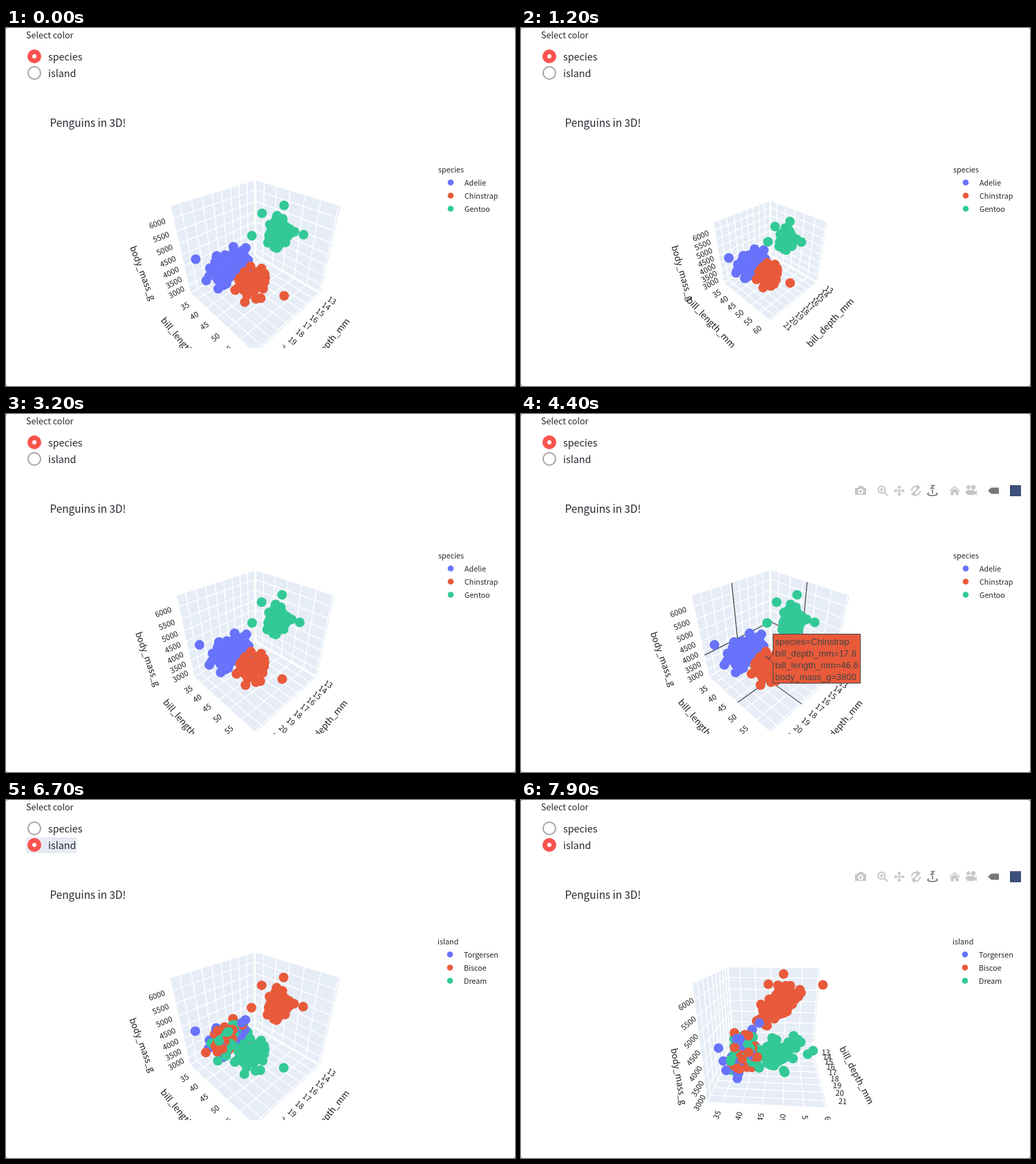
An HTML page with a canvas for the animation above (8 s loop, 736 px wide and 518 px high).

```html
<!DOCTYPE html>
<html lang="en">
<head>
<meta charset="utf-8">
<title>Penguins in 3D</title>
<style>
  html, body { margin: 0; width: 100%; height: 100%; overflow: hidden; background: #777; }
  #stage { position: relative; width: 736px; height: 518px; background: #fff; border-radius: 3px; overflow: hidden; }
  canvas, svg { position: absolute; left: 0; top: 0; }
  text { font-family: 'Noto Sans CJK JP', 'Noto Sans CJK SC', 'Noto Sans', sans-serif; fill: #262730; }
  .small { font-size: 10.75px; }
  .option { font-size: 14.35px; }
  #modebar { fill: none; stroke: #c6c6c6; stroke-width: 2; }
  #modebar .solid { fill: #c6c6c6; stroke: none; }
  #modebar .active { stroke: #777; }
</style>
</head>
<body>
<div id="stage">
  <canvas id="scene" width="736" height="518"></canvas>
  <svg id="ui" width="736" height="518">
    <text x="29" y="15" font-size="12.55">Select color</text>
    <rect id="highlight" x="29" y="54" width="74" height="23" rx="4" fill="#e6ebf3"/>
    <g id="radios"></g>
    <text class="option" x="61" y="47">species</text>
    <text class="option" x="61" y="71">island</text>
    <text x="63.5" y="143" font-size="15.3">Penguins in 3D!</text>
    <g id="legend"></g>
    <g id="modebar">
      <path class="solid" fill-rule="evenodd" d="M483 107h4l2-3h5l2 3h3v10h-16zM491 108a4 4 0 1 0 .1 0zM491 110a2 2 0 1 1-.1 0z"/>
      <circle cx="521.5" cy="109.5" r="5"/><path d="M525 113l5 5M519 109.500h5M521.500 107v5"/>
      <path d="M547 104v14M540 111h14" stroke-width="1.6"/>
      <path class="solid" d="M547 103l3 4h-6zM547 119l3-4h-6zM539 111l4-3v6zM555 111l-4-3v6z"/>
      <path d="M565 111c0-5 4-7 8-6M577 111c0 5-4 7-8 6M566 115l10-8"/>
      <path class="solid" d="M572 102l6 4-6 3zM570 120l-6-4 6-3z"/>
      <path class="active" d="M592.500 103.500h5l-5 4h5" stroke-width="1.4"/>
      <path class="active" d="M595 109v6M590 114c-5 2 0 4 5 4s10-2 5-4" stroke-width="1.6"/>
      <path class="solid" d="M619 111l8-7 8 7-1 1-7-6-7 6zM621.500 112l5.500-4.500 5.500 4.500v5.500h-4v-4h-3v4h-4z"/>
      <circle class="solid" cx="647" cy="106" r="2.800"/><circle class="solid" cx="654" cy="106" r="3.200"/>
      <path class="solid" d="M645 110h11v7h-11zM656 113l3-2.500v7l-3-2.500zM643 111h2v4h-2z"/>
      <path d="M675 111l5-4.500h11v9h-11z" fill="#777" stroke="none"/>
      <rect x="707" y="103" width="16" height="16" fill="#3d5078" stroke="none"/>
    </g>
  </svg>
</div>
<script>
const LOOP = 8000, STEP = 100;
const FONT = "'Noto Sans CJK JP','Noto Sans CJK SC','Noto Sans',sans-serif";
const COLORS = ['#6872fa', '#e85a3a', '#33c997'];
const LEGENDS = {
  species: ['Adelie', 'Chinstrap', 'Gentoo'],
  island: ['Torgersen', 'Biscoe', 'Dream']
};
// Axis order: bill depth, bill length, body mass
const AXES = [
  { title: 'bill_depth_mm', min: 12.84, max: 21.76, first: 13, last: 21, step: 1, edge: [0, .5, -.5], out: 1 },
  { title: 'bill_length_mm', min: 31.24, max: 60.46, first: 35, last: 60, step: 5, edge: [.5, 0, -.5], out: 0 },
  { title: 'body_mass_g', min: 2587.5, max: 6412.5, first: 3000, last: 6000, step: 500, edge: [.5, -.5, 0], out: 0 }
];
const HOME = { dist: 2.165, azimuth: 45, elevation: 35.264 };
const HOVERS = [
  { from: 3300, to: 3600, kind: 1, at: [20.3, 50.7, 4050] },
  { from: 3900, to: 4300, kind: 1, at: [19.7, 50.1, 3900] },
  { from: 4300, to: 4800, kind: 1, at: [17.8, 46.6, 3800] },
  { from: 4800, to: 5200, kind: 2, at: [15.7, 54.3, 5650] }
];

const $ = id => document.getElementById(id);
const ctx = $('scene').getContext('2d');
const clamp = x => Math.min(1, Math.max(0, x));
const ramp = (t, a, b) => clamp((t - a) / (b - a));
const smooth = x => x * x * (3 - 2 * x);
const mix = (a, b, k) => a + (b - a) * k;
const norm = v => v.map((x, i) => (x - AXES[i].min) / (AXES[i].max - AXES[i].min) - .5);
const put = (p, axis, value) => p.map((x, i) => i === axis ? value : x);

let seed = 20;
function random() {
  seed = (seed * 1664525 + 1013904223) % 4294967296;
  return seed / 4294967296;
}
const bell = () => (random() + random() - 1) * 2.2;

const points = [];
// A factor shared by the three measures makes them grow together
function addCluster(species, count, bond, mean, spread, extremes) {
  const islandOf = i => species === 0 ? [0, 2, 1][i % 3] : 3 - species;
  const free = Math.sqrt(1 - bond * bond);
  for (let i = 0; i < count; i++) {
    const shared = bell();
    const at = mean.map((m, k) => m + spread[k] * (bond * shared + free * bell()));
    points.push({ pos: norm(at), species, island: islandOf(i) });
  }
  for (const at of extremes) points.push({ pos: norm(at), species, island: islandOf(0) });
}
addCluster(0, 148, .7, [18.35, 38.7, 3700], [1.22, 2.66, 459],
  [[21.1, 34.6, 4400], [17.6, 42.9, 4700], [20.2, 35.1, 3370]]);
addCluster(1, 61, .75, [18.42, 48.5, 3733], [1.14, 2.9, 384],
  [[17.8, 58, 3700], [19.8, 55.8, 4000], [20.7, 52, 4800], [19.9, 50.2, 3300], [16.6, 40.9, 3200], [16.6, 46.9, 2700]]);
addCluster(2, 118, .86, [14.98, 47.4, 5076], [.98, 3, 504],
  [[17, 59.6, 6050], [15.2, 49.2, 6300], [16.35, 45.1, 6000], [17.3, 44.4, 5250], [15.7, 54.3, 5650]]);

function makeCamera({ dist, azimuth, elevation }, cx) {
  const a = azimuth * Math.PI / 180, e = elevation * Math.PI / 180;
  const [ca, sa, ce, se] = [Math.cos(a), Math.sin(a), Math.cos(e), Math.sin(e)];
  return ([x, y, z]) => {
    const depth = dist - (ce * (ca * x + sa * y) + se * z);
    const k = 326 / depth;
    return {
      x: cx + k * (ca * y - sa * x),
      y: 328.7 - k * (ce * z - se * (ca * x + sa * y)),
      depth
    };
  };
}

function strokeLine(project, a, b) {
  const p = project(a), q = project(b);
  ctx.beginPath();
  ctx.moveTo(p.x, p.y);
  ctx.lineTo(q.x, q.y);
  ctx.stroke();
}

function eachWall(draw) {
  for (let wall = 0; wall < 3; wall++) {
    draw(wall, ...[0, 1, 2].filter(i => i !== wall));
  }
}

function ticks(i) {
  const { first, last, step, min, max } = AXES[i], list = [];
  for (let v = first; v <= last; v += step) list.push([v, (v - min) / (max - min) - .5]);
  return list;
}

function drawWalls(project) {
  const corner = [-.5, -.5, -.5];
  eachWall((wall, i, j) => {
    ctx.fillStyle = '#e6edf6';
    ctx.beginPath();
    for (const [a, b] of [[-.5, -.5], [.5, -.5], [.5, .5], [-.5, .5]]) {
      const p = project(put(put(corner, i, a), j, b));
      ctx.lineTo(p.x, p.y);
    }
    ctx.fill();
  });
  ctx.strokeStyle = '#fff';
  ctx.lineWidth = 1.4;
  eachWall((wall, i, j) => {
    for (const [along, across] of [[i, j], [j, i]]) {
      for (const v of [-.5, ...ticks(along).map(t => t[1])]) {
        const p = put(corner, along, v);
        strokeLine(project, p, put(p, across, .5));
      }
    }
  });
}

function rotatedText(text, p, angle, size) {
  if (angle > Math.PI / 2) angle -= Math.PI;
  if (angle <= -Math.PI / 2) angle += Math.PI;
  ctx.save();
  ctx.translate(p.x, p.y);
  ctx.rotate(angle);
  ctx.font = `${size}px ${FONT}`;
  ctx.fillText(text, 0, size * .35);
  ctx.restore();
}

const angleOf = (a, b) => Math.atan2(b.y - a.y, b.x - a.x);

function drawLabels(project, dist) {
  ctx.fillStyle = '#1c1c20';
  ctx.textAlign = 'center';
  AXES.forEach(({ title, edge, out }, i) => {
    const outward = k => put(edge, out, .5 + k * dist);
    for (const [value, v] of ticks(i)) {
      const base = project(put(edge, i, v)), spot = project(put(outward(.067), i, v));
      rotatedText(value, spot, angleOf(base, spot), 11);
    }
    const far = outward(.175);
    const angle = angleOf(project(put(far, i, -.5)), project(put(far, i, .5)));
    rotatedText(title, project(far), angle, 12.8);
  });
}

function drawSpikes(project, pos) {
  eachWall((wall, i, j) => {
    const foot = put(pos, wall, -.5);
    for (const k of [i, j]) strokeLine(project, put(foot, k, -.5), put(foot, k, .5));
  });
}

// Short pieces, so that markers can hide parts of the line
function spikePieces(project, pos) {
  const pieces = [], n = 30;
  for (let axis = 0; axis < 3; axis++) {
    for (let s = 0; s < n; s++) {
      const at = k => put(pos, axis, mix(pos[axis], -.5, k / n));
      pieces.push({ depth: project(at(s + .5)).depth, line: [at(s), at(s + 1)] });
    }
  }
  return pieces;
}

function drawMarkers(project, mode, pieces) {
  const items = points.map(pt => ({ ...project(pt.pos), color: COLORS[pt[mode]] })).concat(pieces);
  items.sort((a, b) => b.depth - a.depth);
  for (const item of items) {
    if (item.line) {
      strokeLine(project, ...item.line);
      continue;
    }
    ctx.fillStyle = item.color;
    ctx.beginPath();
    ctx.arc(item.x, item.y, 7, 0, 7);
    ctx.fill();
  }
}

function drawTooltip(p, { kind, at }) {
  const lines = [`species=${LEGENDS.species[kind]}`, ...AXES.map((a, i) => `${a.title}=${at[i]}`)];
  ctx.font = "13px 'Liberation Sans', Arial, sans-serif";
  ctx.textAlign = 'left';
  const width = Math.max(...lines.map(s => ctx.measureText(s).width)) + 6;
  const x = Math.round(p.x) + 6.5, y = Math.round(p.y) - 35.5;
  ctx.beginPath();
  for (const [dx, dy] of [[0, 0], [width, 0], [width, 71], [0, 71], [0, 41.5], [-6, 35.5], [0, 29.5]]) {
    ctx.lineTo(x + dx, y + dy);
  }
  ctx.closePath();
  ctx.fillStyle = COLORS[kind];
  ctx.fill();
  ctx.lineWidth = 1;
  ctx.stroke();
  ctx.fillStyle = '#444';
  lines.forEach((s, i) => ctx.fillText(s, x + 3, y + 15 + 17 * i));
}

function viewAt(t) {
  let { dist, azimuth, elevation } = HOME;
  if (t < 6300) {
    dist = t < 1200 ? mix(dist, 3.1, smooth(ramp(t, 200, 1200))) : mix(3.1, 2.31, smooth(ramp(t, 1200, 2100)));
  }
  const turn = ramp(t, 7000, 7900);
  return { dist, azimuth: mix(azimuth, 4, turn), elevation: mix(elevation, 21, turn) };
}

function drawScene(t, mode) {
  const view = viewAt(t);
  const project = makeCamera(view, mode === 'island' ? 360.4 : 361);
  const hover = HOVERS.find(h => t >= h.from && t < h.to);
  const pos = hover && norm(hover.at);
  ctx.clearRect(0, 0, 736, 518);
  ctx.save();
  ctx.beginPath();
  ctx.rect(0, 193, 736, 270);
  ctx.clip();
  drawWalls(project);
  ctx.strokeStyle = '#444';
  ctx.lineWidth = 1.2;
  if (hover) drawSpikes(project, pos);
  drawLabels(project, view.dist);
  drawMarkers(project, mode, hover ? spikePieces(project, pos) : []);
  if (hover) drawTooltip(project(pos), hover);
  ctx.restore();
}

function drawUi(t, mode) {
  const chosen = t < 6200 ? 0 : 1;
  $('radios').innerHTML = [41, 65].map((y, i) => i === chosen
    ? `<circle cx="41" cy="${y}" r="10" fill="#f9534f"/><circle cx="41" cy="${y}" r="3" fill="#fff"/>`
    : `<circle cx="41" cy="${y}" r="9" fill="#fff" stroke="#a5a5aa" stroke-width="2"/>`).join('');
  $('highlight').style.opacity = t >= 6200 && t < 6900 ? 1 : 0;
  const x = mode === 'island' ? 624 : 625;
  $('legend').innerHTML = `<text class="small" x="${x}" y="208.500">${mode}</text>` +
    LEGENDS[mode].map((name, i) => {
      const y = 223.5 + 19 * i;
      return `<circle cx="${x + 18}" cy="${y}" r="4.300" fill="${COLORS[i]}"/>` +
        `<text class="small" x="${x + 38}" y="${y + 4.5}">${name}</text>`;
    }).join('');
  $('modebar').style.opacity = ramp(t, 3200, 3500) - ramp(t, 5500, 5800) + ramp(t, 6800, 7100);
}

let shown = -1, start;
function tick(now) {
  start ??= now;
  const t = Math.floor(Math.max(0, now - start) % LOOP / STEP) * STEP;
  if (t !== shown) {
    shown = t;
    const mode = t < 6600 ? 'species' : 'island';
    drawScene(t, mode);
    drawUi(t, mode);
  }
  requestAnimationFrame(tick);
}
tick(performance.now());
</script>
</body>
</html>
```
